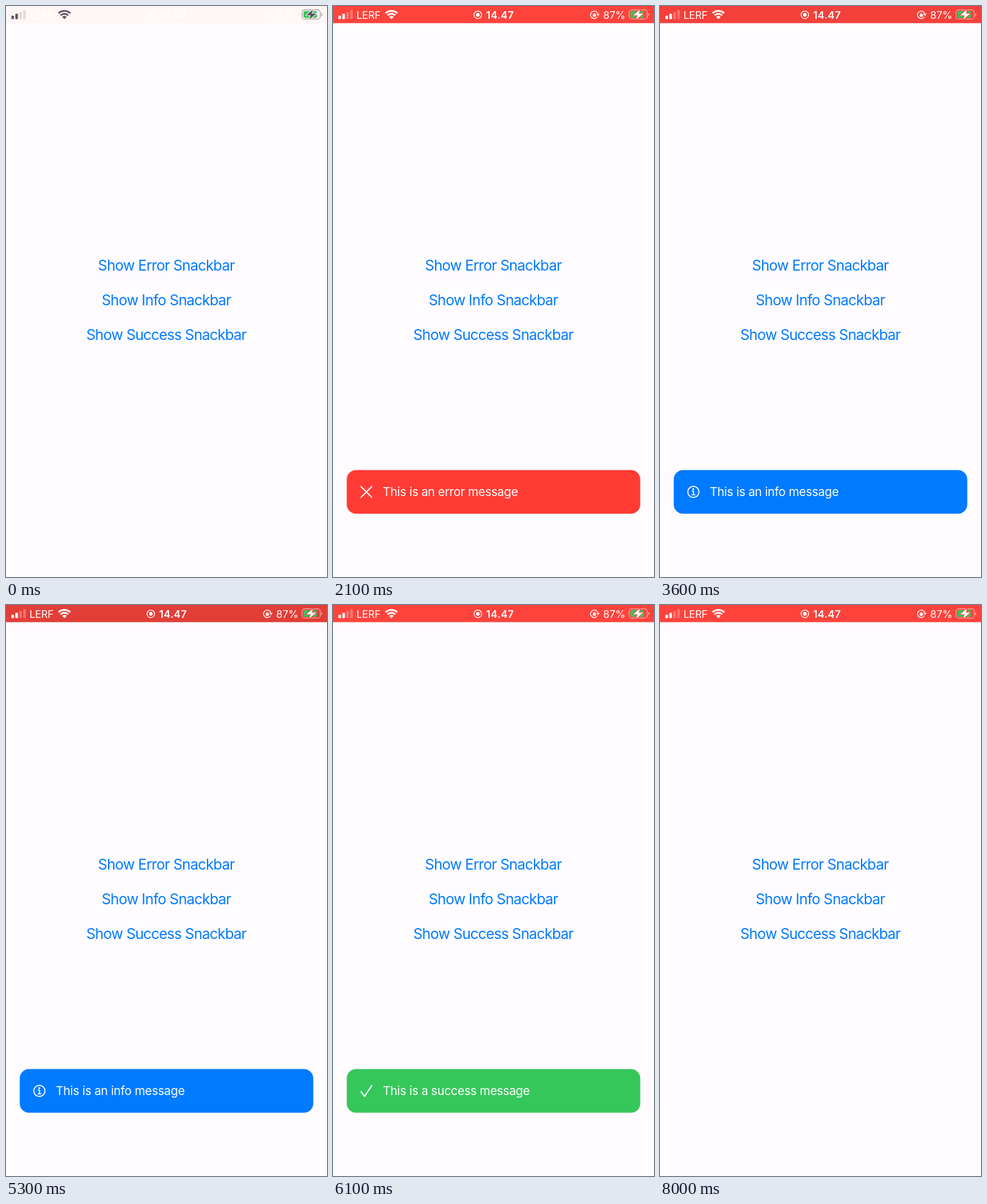
Animation of 500x889 px, one loop 8100 ms. Source, as an HTML page with a canvas:

```html
<!DOCTYPE html>
<html lang="en">
<head>
<meta charset="utf-8">
<title>Snackbar demo</title>
<style>
html, body { margin: 0; width: 100%; height: 100%; overflow: hidden; background: #fefcff; }
canvas { display: block; width: 100vw; height: 100vh; }
</style>
</head>
<body>
<canvas id="stage"></canvas>
<script>
const W = 500, H = 889, LOOP = 8100, STEP = 100;
const BLUE = '#007aff', WHITE = '#fff', BG = '#fefcff';
const FONT = 'Inter, Roboto, "Liberation Sans", sans-serif';
const SLIDE = 150, DROP = 175;

const canvas = document.getElementById('stage');
const ctx = canvas.getContext('2d');
const dpr = window.devicePixelRatio || 1;
canvas.width = W * dpr;
canvas.height = H * dpr;
ctx.scale(dpr, dpr);

const buttons = [
  { label: 'Show Error Snackbar', y: 412.2, tap: 970 },
  { label: 'Show Info Snackbar', y: 466.2, tap: 3330 },
  { label: 'Show Success Snackbar', y: 520.2, tap: 5850 }
];
const bars = [
  { text: 'This is an error message', color: '#ff3b34', icon: cross, from: 983, to: 3010 },
  { text: 'This is an info message', color: BLUE, icon: info, from: 3343, to: 5352 },
  { text: 'This is a success message', color: '#36c75b', icon: check, from: 5863, to: 7867 }
];

const clamp = v => Math.max(0, Math.min(1, v));
const ease = u => u < 0.5 ? 2 * u * u : 1 - 2 * (1 - u) * (1 - u);
const mix = (a, b, k) => a.map((v, i) => v + (b[i] - v) * k);
const rgb = c => `rgb(${c.map(Math.round).join(',')})`;

function text(str, x, y, size, color, { weight = 400, align = 'left', gap = 0 } = {}) {
  ctx.font = `${weight} ${size}px ${FONT}`;
  ctx.letterSpacing = gap + 'px';
  ctx.textAlign = align;
  ctx.fillStyle = color;
  ctx.fillText(str, x, y);
}

function box(x, y, w, h, r, color) {
  ctx.beginPath();
  ctx.roundRect(x, y, w, h, r);
  ctx.fillStyle = color;
  ctx.fill();
}

function line(pts, width, color) {
  ctx.beginPath();
  pts.forEach(([x, y]) => ctx.lineTo(x, y));
  ctx.lineWidth = width;
  ctx.lineCap = 'round';
  ctx.lineJoin = 'round';
  ctx.strokeStyle = color;
  ctx.stroke();
}

function arc(x, y, r, width, color, a = 0, b = Math.PI * 2) {
  ctx.beginPath();
  ctx.arc(x, y, r, a, b);
  ctx.lineWidth = width;
  ctx.lineCap = 'butt';
  ctx.strokeStyle = color;
  ctx.stroke();
}

function dot(x, y, r, color) {
  ctx.beginPath();
  ctx.arc(x, y, r, 0, Math.PI * 2);
  ctx.fillStyle = color;
  ctx.fill();
}

function cross() {
  line([[43.7, 748.3], [60.3, 764.9]], 2, WHITE);
  line([[60.3, 748.3], [43.7, 764.9]], 2, WHITE);
}

function info() {
  arc(52, 756.5, 8.7, 1.7, WHITE);
  dot(51.7, 752.2, 1.4, WHITE);
  line([[50.2, 755.4], [52.3, 755.4], [52.3, 760.9]], 1.6, WHITE);
  line([[49.9, 761], [54.6, 761]], 1.5, WHITE);
}

function check() {
  line([[43.6, 757.6], [49.2, 765], [60.3, 748.2]], 2, WHITE);
}

function wifi(color) {
  const mid = -Math.PI / 2, half = 0.78;
  for (const r of [12.9, 8.4]) arc(91, 20.5, r, 2.9, color, mid - half, mid + half);
  ctx.beginPath();
  ctx.moveTo(91, 20.6);
  ctx.arc(91, 20.6, 5, mid - half, mid + half);
  ctx.fillStyle = color;
  ctx.fill();
}

function rotationLock(color) {
  arc(407, 13.7, 5.8, 1.3, color, 0.55, Math.PI * 2 - 0.1);
  line([[410.8, 12.6], [412.9, 14.8], [414.4, 12.4]], 1.2, color);
  box(404.6, 13, 4.8, 3.8, 0.7, color);
  arc(407, 13, 1.5, 1, color, Math.PI, Math.PI * 2);
}

function battery(ink, back) {
  ctx.globalAlpha = 0.5;
  ctx.beginPath();
  ctx.roundRect(461.3, 6, 28.2, 14.4, 4);
  ctx.lineWidth = 1.3;
  ctx.strokeStyle = ink;
  ctx.stroke();
  box(490.9, 11, 1.7, 4.8, [0, 2, 2, 0], ink);
  ctx.globalAlpha = 1;
  box(463.4, 8, 21, 10.4, 2.4, '#34c759');

  const bolt = [[478.2, 5.2], [467.6, 14.4], [474.4, 14.4], [472.2, 21.2], [483.4, 11.8], [476.4, 11.8]];
  line([...bolt, bolt[0]], 2, back);
  ctx.fillStyle = ink;
  ctx.fill();
}

function statusBar(t) {
  const pulse = (1 + Math.cos(Math.PI * t / 1000)) / 2;
  const red = mix([219, 59, 54], [255, 67, 60], pulse);
  const k = clamp(t / 200);
  const back = rgb(mix([255, 247, 245], red, k));
  const ink = rgb(mix([92, 86, 100], [255, 255, 255], k));

  ctx.fillStyle = back;
  ctx.fillRect(0, 0, W, 26.7);

  for (let i = 0; i < 4; i++) {
    const h = 5.4 + i * 2.9;
    ctx.globalAlpha = i < 2 ? 1 : 0.18 + 0.1 * k;
    box(8.4 + i * 6.15, 20.4 - h, 4, h, 1, ink);
  }
  ctx.globalAlpha = 1;
  wifi(ink);
  text('LERF', 36.5, 19.5, 16, WHITE, { gap: -0.25 });
  arc(225.6, 13.7, 5.9, 1.3, WHITE);
  dot(225.6, 13.7, 2.9, WHITE);
  text('14.47', 238.5, 19.5, 16, WHITE, { weight: 600, gap: 0.25 });
  rotationLock(WHITE);
  text('87%', 420.8, 19.5, 16, WHITE);
  battery(ink, back);
}

function button({ label, y, tap }, t) {
  const d = t - tap;
  const dim = Math.min(clamp(d / 100), clamp((250 - d) / 150));
  ctx.globalAlpha = 1 - 0.7 * dim;
  text(label, 249.7, y, 22.67, BLUE, { align: 'center', gap: -0.73 });
  ctx.globalAlpha = 1;
}

function snackbar(bar, t) {
  const shown = ease(clamp((t - bar.from) / SLIDE)) - ease(clamp((t - bar.to) / SLIDE));
  if (shown <= 0) return;
  ctx.save();
  ctx.translate(0, DROP * (1 - shown));
  box(21.4, 722.6, 457.2, 67.8, 14.5, bar.color);
  bar.icon();
  text(bar.text, 77.6, 763.4, 18.67, WHITE, { gap: -0.28 });
  ctx.restore();
}

function draw(now) {
  const t = Math.floor((now % LOOP) / STEP) * STEP;
  ctx.fillStyle = BG;
  ctx.fillRect(0, 0, W, H);
  statusBar(t);
  buttons.forEach(b => button(b, t));
  bars.forEach(b => snackbar(b, t));
}

const start = performance.now();
function tick() {
  draw(performance.now() - start);
  requestAnimationFrame(tick);
}
tick();
</script>
</body>
</html>
```
